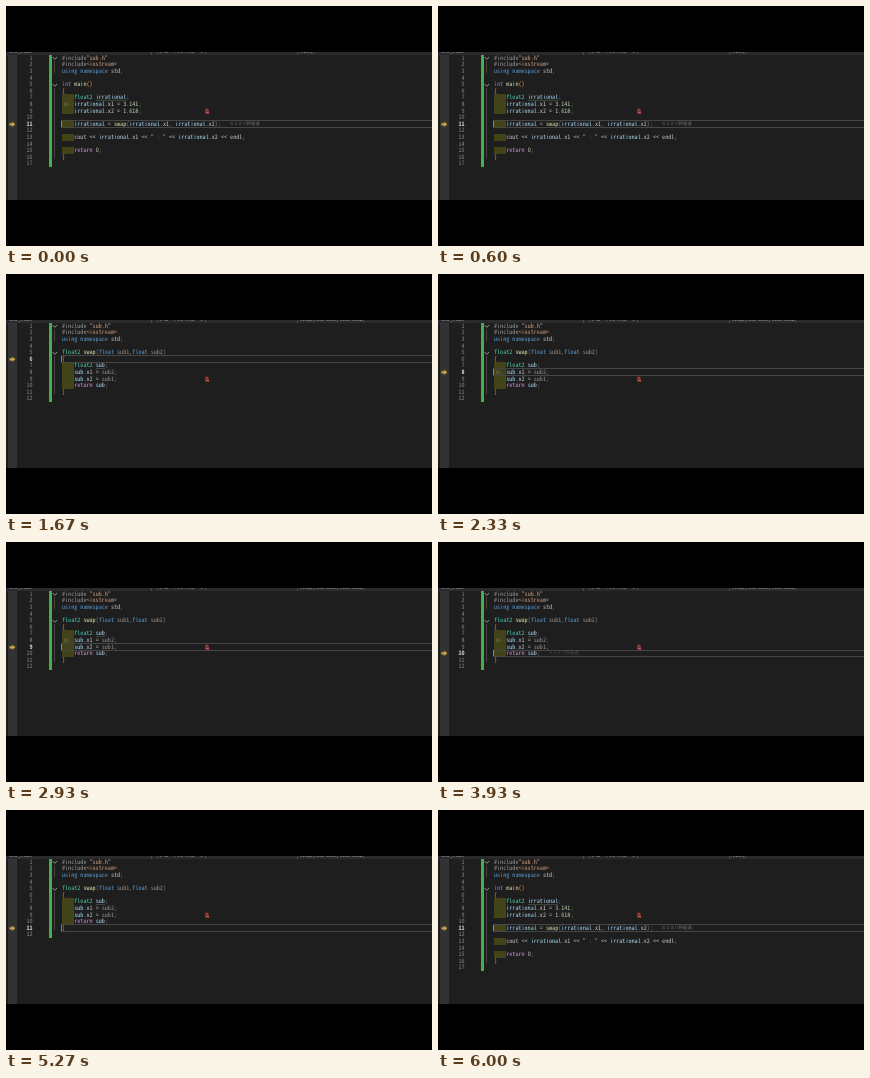
Write an HTML page that moves like this. It is 426x240 px and loops after 6070 ms.

```html
<!DOCTYPE html>
<html>
<head>
<meta charset="utf-8">
<title>Stepping through swap</title>
<style>
html, body { margin: 0; width: 100%; height: 100%; overflow: hidden; background: #000; }
#stage { position: absolute; left: 0; top: 0; width: 426px; height: 240px; overflow: hidden; text-rendering: geometricPrecision; }
#stage div, #stage svg { position: absolute; }
#editor { left: 0; top: 46px; width: 426px; height: 147.5px; background: #1e1e1e; overflow: hidden; }
#margin { left: 2px; top: 0; width: 8.5px; height: 148px; background: #323232; }
#nav { left: 0; top: 0; width: 426px; height: 2.6px; background: #2b2b2e; overflow: hidden; }
#nav div { top: -4px; font: 5px/7px "Noto Sans CJK JP", "Noto Sans", sans-serif; color: #aaa; white-space: pre; }
#nav .rule { top: 0; width: 1px; height: 3px; background: #48484c; }
.view { left: 0; top: 0; width: 426px; height: 148px; }
.code, .num { height: 6.6px; line-height: 6.6px; white-space: pre; font-family: "Noto Sans Mono CJK JP", "Liberation Mono", monospace; }
.code { left: 56px; color: #c4c4c4; }
.num { left: 0; width: 26.6px; text-align: right; color: #858585; }
.num.on { color: #d0d0d0; font-weight: bold; }
.indent { left: 56px; width: 12.2px; height: 6.7px; background: #43431a; }
.changed { left: 43px; top: 3px; width: 3px; background: #43b04b; }
.fold { left: 48.4px; width: .7px; background: #444; }
.str { color: #c89a7c; } .pre { color: #989898; } .key { color: #569cd6; } .flow { color: #d08fd8; }
.type { color: #4ec9b0; } .fn { color: #dcdcaa; } .arg { color: #8e8e8e; } .var { color: #a6d8f2; }
.lit { color: #b5cea8; } .brace { color: #b0643a; font-weight: bold; } .punct { color: #7c7c78; }
#row { left: 55.3px; width: 372px; height: 5.7px; border: 1px solid #464646; }
#caret { left: 55.3px; width: 1px; height: 6px; background: #858585; }
#tip { font: 4.3px/6.6px "Noto Sans CJK JP", "Noto Sans", sans-serif; white-space: pre; }
</style>
</head>
<body>
<div id="stage">
  <div id="editor">
    <div id="margin"></div>
    <div id="nav">
      <div style="left:3px">sub_main</div>
      <div style="left:151px">(グローバル スコープ)</div>
      <div id="scope" style="left:293px"></div>
      <div class="rule" style="left:145px"></div>
      <div class="rule" style="left:291px"></div>
    </div>
    <div id="views"></div>
    <div id="row"></div>
    <div id="caret"></div>
    <div id="tip">≤ 1 ミリ秒経過</div>
    <svg id="run" style="left:57px" width="6" height="7" viewBox="0 0 6 7">
      <path d="M1.5 1.5V5M3 1.7L5.2 3.3L3 5Z" fill="none" stroke="#6f7550" stroke-width=".6"/>
    </svg>
    <svg id="arrow" style="left:3px" width="7" height="7" viewBox="0 0 7 7">
      <path d="M.6 2.2H3.2V.8L6.2 3.3L3.2 5.8V4.4H.6Z" fill="#cfad55" stroke="#8f7238" stroke-width=".5"/>
    </svg>
    <svg style="left:198px;top:56px" width="7" height="7" viewBox="0 0 7 7">
      <path d="M1.8 1.2H4V3L5 5.3L3 4.6L1.8 5.6Z" fill="#5e2c29" stroke="#d0443a" stroke-width=".8"/>
      <path d="M2.6 4.3L4.4 5" stroke="#d8c4c0" stroke-width=".6"/>
    </svg>
  </div>
</div>
<script>
const LOOP = 6070, PITCH = 6.6, TOP = 2.7, CELL = 3.06;
const $ = id => document.getElementById(id);
const lineTop = n => TOP + (n - 1) * PITCH;

const sources = {
  main: {
    scope: 'main()',
    code: `#include"sub.h"
#include<iostream>
using namespace std;

int main()
{
    float2 irrational;
    irrational.x1 = 3.141;
    irrational.x2 = 1.618;

    irrational = swap(irrational.x1, irrational.x2);

    cout << irrational.x1 << " : " << irrational.x2 << endl;

    return 0;
}
`
  },
  swap: {
    scope: ' swap(float sub1, float sub2)',
    code: `#include "sub.h"
#include<iostream>
using namespace std;

float2 swap(float sub1,float sub2)
{
    float2 sub;
    sub.x1 = sub2;
    sub.x2 = sub1;
    return sub;
}
`
  }
};

// start time, view, current line
const steps = [
  [0, 'main', 11], [800, 'swap', 6], [2200, 'swap', 8], [2800, 'swap', 9],
  [3600, 'swap', 10], [4330, 'swap', 11], [5330, 'main', 11]
];

const kinds = ['str', 'pre', 'key', 'flow', 'type', 'fn', 'arg', 'var', 'lit', 'brace', 'punct'];
const token = /("[^"]*"|<iostream>)|(#include)|\b(using|namespace|int|float)\b|\b(return)\b|\b(float2)\b|\b(swap|main)\b|\b(sub[12])\b|\b(irrational|sub)\b|\b(\d[\d.]*)|(\(\)|[{}])|([();,])/g;

function add(parent, cls, style, text = '') {
  const el = document.createElement('div');
  el.className = cls;
  Object.assign(el.style, style);
  el.textContent = text;
  parent.append(el);
  return el;
}

function paint(el, text) {
  let at = 0;
  for (const m of text.matchAll(token)) {
    const span = document.createElement('span');
    span.className = kinds[m.slice(1).findIndex(Boolean)];
    span.textContent = m[0];
    el.append(text.slice(at, m.index), span);
    at = m.index + m[0].length;
  }
  el.append(text.slice(at));
}

// font size that gives the wanted character cell
function cellFont() {
  const pen = document.createElement('canvas').getContext('2d');
  pen.font = '100px "Noto Sans Mono CJK JP", "Liberation Mono", monospace';
  return CELL * 100 / pen.measureText('0').width + 'px';
}

function chevron(parent, y) {
  const box = add(parent, '', { left: '46px', top: y + 'px' });
  box.innerHTML = '<svg width="6" height="5"><path d="M.7 1L2.9 3.3L5.1 1" fill="none" stroke="#a0a0a0" stroke-width=".9"/></svg>';
}

function build({ code }) {
  const view = add($('views'), 'view', {});
  const lines = code.split('\n'), last = lines.length, fontSize = cellFont();
  add(view, 'changed', { height: lineTop(last + 1) - 3 + 'px' });
  for (const [from, to] of [[2, 3], [6, last - 1]]) {
    chevron(view, lineTop(from - 1) + 1.4);
    add(view, 'fold', { top: lineTop(from) + 'px', height: (to - from + 1) * PITCH - 1 + 'px' });
  }
  const nums = lines.map((text, i) => {
    const top = lineTop(i + 1) + 'px';
    if (text.startsWith(' ')) add(view, 'indent', { top });
    paint(add(view, 'code', { top, fontSize }), text);
    return add(view, 'num', { top, fontSize }, i + 1);
  });
  const name = lines[6].trim().slice(7, -1);
  add(view, '', {
    left: 56 + 11 * CELL + 'px', top: lineTop(8) - .6 + 'px',
    width: name.length * CELL + 'px', height: '.6px', background: '#3a4637'
  });
  return { view, nums, lines };
}

const views = {};
for (const name in sources) views[name] = build(sources[name]);

const show = (el, on) => el.style.visibility = on ? 'visible' : 'hidden';

function draw(now) {
  const t = now % LOOP;
  const [, name, line] = steps.findLast(s => s[0] <= t);
  const y = lineTop(line);
  for (const key in views) show(views[key].view, key === name);
  const { nums, lines } = views[name];
  nums.forEach((el, i) => el.classList.toggle('on', i + 1 === line));
  $('scope').textContent = sources[name].scope;
  $('row').style.top = y - .5 + 'px';
  $('caret').style.top = y + .2 + 'px';
  $('arrow').style.top = y + 'px';
  $('run').style.top = lineTop(8) + 'px';
  show($('run'), t < 400 || (t >= 2200 && t < 4330));

  const inMain = name === 'main';
  show($('tip'), inMain || (line === 10 && t >= 3800));
  $('tip').style.left = 64.5 + lines[line - 1].length * CELL + 'px';
  $('tip').style.top = y + 'px';
  $('tip').style.color = inMain ? '#777' : '#505050';
  requestAnimationFrame(() => draw(performance.now() - start));
}

const start = performance.now();
draw(0);
</script>
</body>
</html>
```
